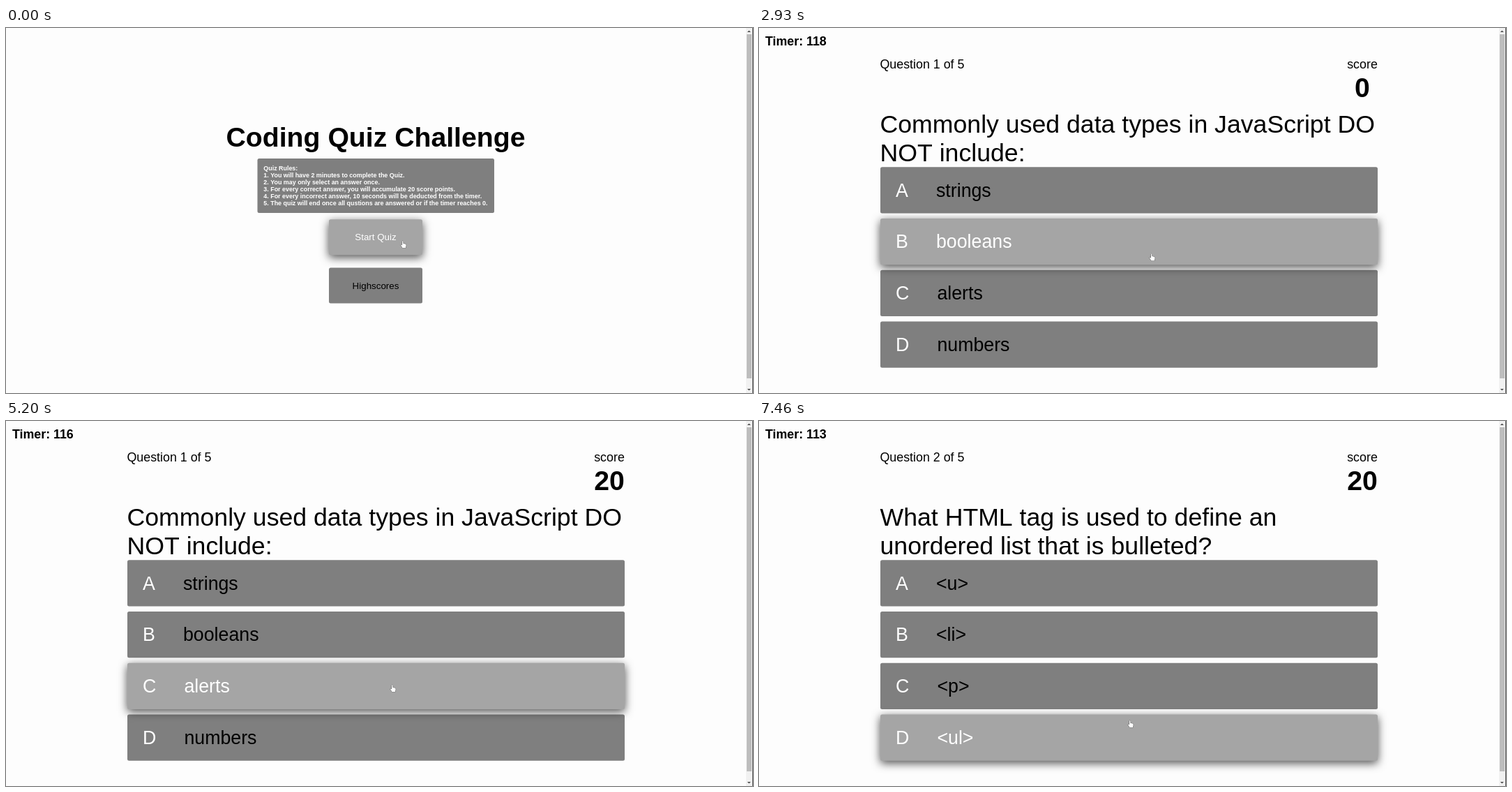
An HTML page with a canvas for the animation above (8000 ms loop, 1071 by 523 pixels).

```html
<!DOCTYPE html>
<html lang="en">
<head>
<meta charset="utf-8">
<title>Coding Quiz Challenge</title>
<style>
  html, body { margin: 0; width: 100%; height: 100%; overflow: hidden; background: #fdfdfd; }
  canvas { display: block; }
</style>
</head>
<body>
<canvas id="stage" width="1071" height="523"></canvas>
<script>
const ctx = document.getElementById('stage').getContext('2d');
const LOOP = 8000, PAGE_AT = 400, TIMER_AT = 460, HOVER_AT = 2060, SCORE_AT = 4460, NEXT_AT = 5460;
const GREY = '#7f7f7f', HOVER = '#a5a5a5';

const rules = [
  'Quiz Rules:',
  '1. You will have 2 minutes to complete the Quiz.',
  '2. You may only select an answer once.',
  '3. For every correct answer, you will accumulate 20 score points.',
  '4. For every incorrect answer, 10 seconds will be deducted from the timer.',
  '5. The quiz will end once all qustions are answered or if the timer reaches 0.'
];
const questions = [
  { lines: ['Commonly used data types in JavaScript DO', 'NOT include:'],
    answers: ['strings', 'booleans', 'alerts', 'numbers'] },
  { lines: ['What HTML tag is used to define an', 'unordered list that is bulleted?'],
    answers: ['<u>', '<li>', '<p>', '<ul>'] }
];
// Pointer path: time, x, y
const path = [
  [0, 570, 310], [2830, 570, 310], [2930, 564, 328], [3000, 560, 350], [3060, 556, 370],
  [3200, 555, 383], [6970, 555, 383], [7100, 549, 396], [7300, 533, 434], [LOOP, 533, 434]
];

function text(str, x, y, size, { color = '#000', weight = 'normal', align = 'left' } = {}) {
  ctx.font = `${weight} ${size}px "Liberation Sans", Arial, sans-serif`;
  ctx.fillStyle = color;
  ctx.textAlign = align;
  ctx.fillText(str, x, y);
}

function box(x, y, w, h, hovered) {
  ctx.save();
  if (hovered) {
    ctx.shadowColor = 'rgba(0,0,0,.7)';
    ctx.shadowBlur = 12.5;
    ctx.shadowOffsetY = 3.5;
  }
  ctx.fillStyle = hovered ? HOVER : GREY;
  ctx.beginPath();
  ctx.roundRect(x, y, w, h, 2.5);
  ctx.fill();
  ctx.restore();
}

function pointerAt(t) {
  const i = path.findIndex(p => p[0] > t);
  const [t0, x0, y0] = path[i - 1], [t1, x1, y1] = path[i];
  const k = (t - t0) / (t1 - t0);
  return { x: x0 + (x1 - x0) * k, y: y0 + (y1 - y0) * k };
}

function drawPointer({ x, y }) {
  ctx.save();
  ctx.translate(x, y);
  ctx.fillStyle = '#fff';
  ctx.strokeStyle = '#333';
  ctx.lineWidth = 0.7;
  ctx.lineJoin = 'round';
  ctx.stroke(hand);
  ctx.fill(hand);
  ctx.restore();
}
const hand = new Path2D('M-1.9 1.5V-4.3Q-1.2-5.6-.5-4.3V-1.2L2.6-.5Q3.8 0 3.7 1.4L3 5.2H-1.4L-4 1.2Q-3.9 0-2.9.6Z');

function drawScrollbar() {
  const rect = (color, x, y, w, h) => { ctx.fillStyle = color; ctx.fillRect(x, y, w, h); };
  rect('#f1f1f1', 1061, 0, 9, 523);
  rect('#bdbdbd', 1062, 9, 7, 493);
  rect('#555', 1070, 0, 1, 523);
  ctx.fillStyle = '#505050';
  for (const [base, tip] of [[6, 3.5], [517, 519.5]]) {
    ctx.beginPath();
    ctx.moveTo(1062.8, base);
    ctx.lineTo(1067.8, base);
    ctx.lineTo(1065.3, tip);
    ctx.fill();
  }
}

function drawStart() {
  text('Coding Quiz Challenge', 530, 170, 39.2, { weight: 'bold', align: 'center' });
  box(360.5, 187, 339.5, 78);
  rules.forEach((line, i) =>
    text(line, 369.3, 203.8 + i * 10.05, 8.914, { color: '#fff', weight: 'bold' }));
  box(463, 343.5, 134, 51);
  text('Highscores', 530, 373.6, 13.37, { align: 'center' });
  box(463, 274.3, 134, 51, true);
  text('Start Quiz', 530, 304.3, 13.37, { color: '#fff', align: 'center' });
}

function drawAnswer(answer, i, hovered) {
  const y = 199.2 + i * 73.75;
  box(174, y, 713, 66.3, hovered);
  text('ABCD'[i], 196, y + 42.4, 26.74, { color: '#fff' });
  text(answer, i < 2 ? 254 : 255.4, y + 42.4, 26.74, { color: hovered ? '#fff' : '#000' });
}

function drawGame(t, pointer) {
  const index = t < NEXT_AT ? 0 : 1;
  const { lines, answers } = questions[index];
  const elapsed = Math.floor((t - TIMER_AT) / 1000);
  text('Timer: ' + (elapsed > 0 ? 120 - elapsed : ''), 8.9, 24.5, 17.83, { weight: 'bold' });
  text(`Question ${index + 1} of 5`, 173.5, 58.2, 17.83);
  text('score', 865, 58.2, 17.83, { align: 'center' });
  text(t < SCORE_AT ? '0' : '20', 865, 99.2, 39.2, { weight: 'bold', align: 'center' });
  lines.forEach((line, i) => text(line, 173.5, 149.7 + i * 41.3, 35.66));

  const offset = pointer.y - 5 - 199.2;
  const hovered = t >= HOVER_AT && offset % 73.75 < 66.3 ? Math.floor(offset / 73.75) : -1;
  answers.forEach((answer, i) => i !== hovered && drawAnswer(answer, i, false));
  if (hovered >= 0) drawAnswer(answers[hovered], hovered, true);
}

function frame() {
  const t = performance.now() % LOOP;
  const pointer = pointerAt(t);
  ctx.fillStyle = '#fdfdfd';
  ctx.fillRect(0, 0, 1071, 523);
  if (t < PAGE_AT) drawStart();
  else drawGame(t, pointer);
  drawScrollbar();
  drawPointer(pointer);
  requestAnimationFrame(frame);
}
frame();
</script>
</body>
</html>
```
